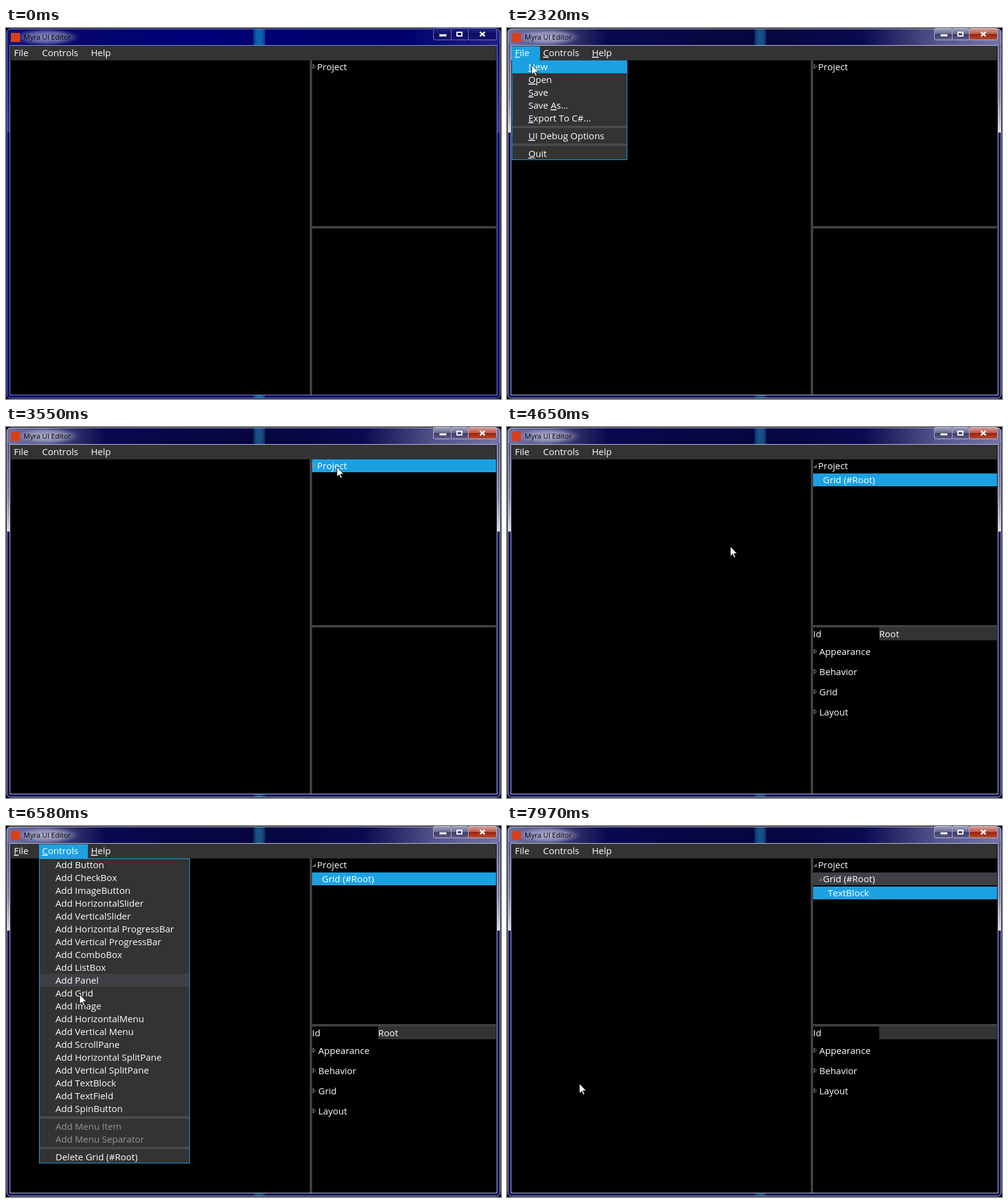
An HTML page that plays this animation: 810x607 px, repeating every 8000 ms.

```html
<!DOCTYPE html>
<html lang="en">
<head>
<meta charset="utf-8">
<title>UI Editor</title>
<style>
  html, body { margin: 0; width: 100%; height: 100%; overflow: hidden; background: #000; }
  svg { display: block; width: 100%; height: 100%; }
  text { font: 15px "Open Sans", sans-serif; font-kerning: none; fill: #fff; }
  .title { font-size: 11.5px; fill: #000; }
  .dim { fill: #959595; }
</style>
</head>
<body>
<svg id="stage" viewBox="0 0 810 607"></svg>
<script>
const LOOP = 8000, STEP = 76, ROW = 21, MENU_TOP = 53;
const BLUE = '#1ba1e2', PANEL = '#333334', HOVER = '#3f3f46';

// Moments at which the interface changes state
const AT = {
  pointer: 140, fileOpen: 1220, newPress: 2320, fileClose: 2390,
  projectHover: 3080, projectSelect: 3550, expand: 3720,
  gridHover: 4130, gridSelect: 4340, controlsHover: 5830,
  controlsOpen: 5960, addPress: 7890, added: 7970
};

// Pointer runs: start, step count, target x, target y, ease power x, ease power y
const ORIGIN = [616, 568];
const RUNS = [
  [216, 9, 14, 34, 2, 1.8],
  [900, 1, 21, 38, 1, 1],
  [1540, 2, 55, 92, 1, 1],
  [1692, 2, 41, 61, 1, 1],
  [1920, 1, 40, 60, 1, 1],
  [2390, 5, 300, 225, 1, 2],
  [2770, 5, 540, 68, 1.5, .7],
  [3170, 2, 541, 65, 1, 1],
  [3980, 4, 545, 81, 1, 1],
  [4490, 11, 179, 243, 2.12, 3.8],
  [5340, 8, 96, 45, 1.5, 1.5],
  [6190, 6, 120, 275, 1.3, 1.2],
  [6646, 5, 118, 371, 1.5, 1.5],
  [7040, 5, 118, 421, 1.4, 1.4]
];

function pointerAt(t) {
  let [x, y] = ORIGIN;
  for (const [start, steps, toX, toY, powX, powY] of RUNS) {
    if (t < start) break;
    const k = Math.min(1, (Math.floor((t - start) / STEP) + 1) / steps);
    x += (toX - x) * (1 - (1 - k) ** powX);
    y += (toY - y) * (1 - (1 - k) ** powY);
  }
  return [Math.round(x), Math.round(y)];
}

const rect = (x, y, w, h, fill, extra = '') =>
  `<rect x="${x}" y="${y}" width="${w}" height="${h}" fill="${fill}" ${extra}/>`;
const outline = (x, y, w, h, color, rx = 0) =>
  rect(x + .5, y + .5, w - 1, h - 1, 'none', `stroke="${color}" rx="${rx}"`);
const timed = (from, to, content) => `<g data-from="${from}" data-to="${to}">${content}</g>`;
const gradient = (id, stops, vertical) =>
  `<linearGradient id="${id}" x2="${vertical ? 0 : 1}" y2="${vertical ? 1 : 0}">` +
  stops.map(([at, color]) => `<stop offset="${at}" stop-color="${color}"/>`).join('') +
  '</linearGradient>';

// An underscore marks the letter to underline
const label = (x, top, text, cls = '') =>
  `<text x="${x}" y="${top + 16}" class="${cls}">` +
  text.replace(/_(.)/, '<tspan text-decoration="underline">$1</tspan>') + '</text>';
const closedArrow = (x, y) =>
  `<path d="M${x + .5} ${y - 3.5}v7l4-3.5z" fill="none" stroke="#a2a2b4" stroke-width=".9"/>`;
const openArrow = (x, y) => `<path d="M${x + 5} ${y - 3}v6h-6z" fill="#6c6c6c"/>`;

const defs = `<defs>
  ${gradient('idleBar', [[0, '#12127c'], [.15, '#06066c'], [.35, '#000078'], [.8, '#00006c'], [1, '#20208a']])}
  ${gradient('liveBar', [[0, '#7474a8'], [.13, '#34346e'], [.2, '#090950'], [.5, '#06063f'], [.72, '#0a0a50'], [.87, '#55558c'], [1, '#7474a8']])}
  ${gradient('idleSide', [[0, '#10107c'], [1, '#3434a0']], true)}
  ${gradient('liveSide', [[0, '#5c5c90'], [.6, '#8585ac'], [1, '#dcdce8']], true)}
  ${gradient('idleStripe', [[0, '#063a8a'], [.3, '#0d62ae'], [.7, '#0d62ae'], [1, '#063a8a']])}
  ${gradient('liveStripe', [[0, '#0c2c62'], [.3, '#184f86'], [.7, '#184f86'], [1, '#0c2c62']])}
  ${gradient('idleButton', [[0, '#22228a'], [.5, '#0c0c64'], [1, '#14146e']], true)}
  ${gradient('liveButton', [[0, '#a0a0c0'], [.48, '#686890'], [.5, '#3a3a68'], [1, '#5c5c8c']], true)}
  ${gradient('closeButton', [[0, '#d8a098'], [.48, '#b85848'], [.5, '#98200c'], [1, '#b84c30']], true)}
  <radialGradient id="glow"><stop offset="0" stop-color="#c4c4dc"/><stop offset=".6" stop-color="#a8a8cc" stop-opacity=".75"/><stop offset="1" stop-color="#8888b8" stop-opacity="0"/></radialGradient>
</defs>`;

function chrome(kind) {
  const live = kind === 'live';
  const line = live ? '#c0c6dc' : '#8c94cc';
  const paint = name => `url(#${kind}${name})`;
  const buttons = [[700, 29], [729, 28], [757, 46]].map(([x, w]) =>
    rect(x, 1, w, 18, live && x === 757 ? 'url(#closeButton)' : paint('Button')) +
    outline(x - 1, 0, w + 1, 20, live ? '#b4b8d0' : '#7478b8', 2)).join('');
  return rect(1, 1, 808, 605, live ? '#0a0a58' : '#000070', 'rx="6"') +
    rect(1, 1, 808, 28, paint('Bar'), 'rx="6"') +
    rect(1, 28, 6, 143, paint('Side')) + rect(803, 28, 6, 143, paint('Side')) +
    rect(405, 2, 19, 27, paint('Stripe')) + rect(405, 600, 19, 6, paint('Stripe')) +
    `<ellipse cx="67" cy="15" rx="54" ry="14" fill="url(#glow)" opacity="${live ? .85 : .7}"/>` +
    outline(1, 1, 808, 605, line, 6) + outline(6, 28, 798, 573, line) + buttons;
}

const glyphs = rect(709, 10, 12, 4, '#fff', 'stroke="#444466" stroke-width=".7"') +
  '<rect x="738" y="7" width="8" height="6" fill="none" stroke="#fff" stroke-width="2"/>' +
  '<path d="M775.500 6.500l8 7m0-7l-8 7" stroke="#fff" stroke-width="2.400"/>' +
  rect(8, 8, 15, 15, '#d8401c') +
  '<text class="title" x="29" y="19">Myra UI Editor</text>';

const menuBar = (mark, active) =>
  (active === 'File' ? rect(7, 30, 47, 23, BLUE) : '') +
  (active === 'Controls' ? rect(54, 30, 80, 23, BLUE) : '') +
  label(13, 30, mark + 'File') + label(59, 30, mark + 'Controls') + label(139, 30, mark + 'Help');

// Items: '-' is a separator, a leading '~' marks a disabled entry
function menu(id, x, width, height, items) {
  let y = MENU_TOP;
  const rows = items.map(item => {
    const top = y;
    y += item === '-' ? 8 : ROW;
    if (item === '-') return rect(x + 1, top + 2, width - 2, 4, '#4a4a4c');
    return label(x + 27, top, item.replace('~', ''), item[0] === '~' ? 'dim' : '');
  }).join('');
  return rect(x, MENU_TOP, width, height, PANEL) +
    rect(x + 1, MENU_TOP, width - 2, ROW, HOVER, `id="${id}"`) +
    outline(x, MENU_TOP, width, height, BLUE) + rows;
}

const fileItems = ['_New', '_Open', '_Save', 'Save _As...', '_Export To C#...', '-', '_UI Debug Options', '-', '_Quit'];
const controlItems = ['Button', 'CheckBox', 'ImageButton', 'HorizontalSlider', 'VerticalSlider',
  'Horizontal ProgressBar', 'Vertical ProgressBar', 'ComboBox', 'ListBox', 'Panel', 'Grid', 'Image',
  'HorizontalMenu', 'Vertical Menu', 'ScrollPane', 'Horizontal SplitPane', 'Vertical SplitPane',
  'TextBlock', 'TextField', 'SpinButton'].map(name => 'Add ' + name)
  .concat('-', '~Add Menu Item', '~Add Menu Separator', '-', 'Delete Grid (#Root)');

const treeRow = (top, fill) => rect(501, top, 301, ROW, fill);
const properties = (id, sections) =>
  label(501, 328, 'Id') + rect(609, 328, 193, ROW, PANEL) + label(609, 328, id) +
  sections.map((name, i) => closedArrow(502, 367 + 33 * i) + label(511, 357 + 33 * i, name)).join('');

document.getElementById('stage').innerHTML = defs + rect(0, 0, 810, 607, '#000') +
  timed(0, AT.fileOpen, chrome('idle')) + timed(AT.fileOpen, LOOP, chrome('live')) + glyphs +
  rect(7, 29, 796, 571, '#000') + rect(8, 29, 794, 24, PANEL) +
  rect(497, 53, 4, 547, HOVER) + rect(501, 324, 301, 4, HOVER) +
  // Tree
  timed(AT.projectHover, AT.projectSelect, treeRow(53, HOVER)) +
  timed(AT.projectSelect, AT.gridSelect, treeRow(53, BLUE)) +
  timed(AT.gridHover, AT.gridSelect, treeRow(76, HOVER)) +
  timed(AT.gridSelect, AT.added, treeRow(76, BLUE)) +
  timed(AT.added, LOOP, treeRow(76, HOVER) + treeRow(99, BLUE) + openArrow(510, 87) + label(525, 99, 'TextBlock')) +
  timed(0, AT.expand, closedArrow(502, 63)) + timed(AT.expand, LOOP, openArrow(502, 64) + label(517, 76, 'Grid (#Root)')) +
  label(509, 53, 'Project') +
  // Properties
  timed(AT.gridSelect, AT.added, properties('Root', ['Appearance', 'Behavior', 'Grid', 'Layout'])) +
  timed(AT.added, LOOP, properties('', ['Appearance', 'Behavior', 'Layout'])) +
  // Menus
  timed(AT.controlsHover, AT.controlsOpen, rect(54, 30, 80, 23, HOVER)) +
  timed(0, AT.fileOpen, menuBar('')) +
  timed(AT.fileOpen, AT.fileClose, menuBar('_', 'File') + menu('fileRow', 8, 189, 163, fileItems)) +
  timed(AT.fileClose, AT.controlsOpen, menuBar('')) +
  timed(AT.controlsOpen, AT.added, menuBar('_', 'Controls') + menu('controlsRow', 54, 247, 499, controlItems)) +
  timed(AT.added, LOOP, menuBar('')) +
  timed(AT.pointer, LOOP, '<path id="pointer" d="M.5.5v16l3.700-3.500 2.600 5.700 2.200-1-2.600-5.600h5.100z" fill="#fff" stroke="#000" stroke-width=".8"/>');

const layers = [...document.querySelectorAll('[data-from]')].map(el =>
  ({ el, from: +el.dataset.from, to: +el.dataset.to }));
const pointer = document.getElementById('pointer');
const highlights = [['fileRow', AT.newPress], ['controlsRow', AT.addPress]]
  .map(([id, press]) => ({ el: document.getElementById(id), press }));

function render(t) {
  for (const { el, from, to } of layers) el.style.display = t >= from && t < to ? '' : 'none';
  pointer.setAttribute('transform', `translate(${pointerAt(t)})`);
  // The highlighted row trails the pointer by one step
  const row = Math.floor((pointerAt(t - STEP)[1] - MENU_TOP) / ROW);
  for (const { el, press } of highlights) {
    el.style.display = row >= 0 ? '' : 'none';
    el.setAttribute('y', MENU_TOP + row * ROW);
    el.setAttribute('fill', t >= press ? BLUE : HOVER);
  }
}

const began = performance.now();
function tick() {
  render((performance.now() - began) % LOOP);
  requestAnimationFrame(tick);
}
tick();
</script>
</body>
</html>
```
